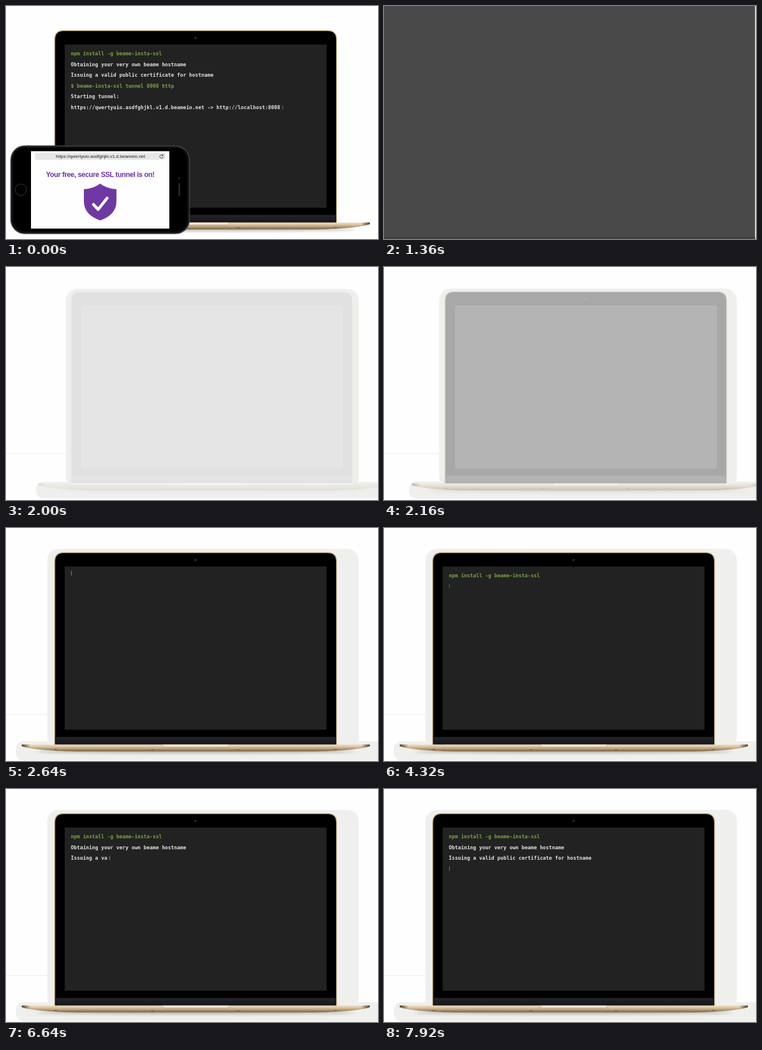
An HTML page that plays this animation: 640x402 px, repeating every 8 s.

```html
<!DOCTYPE html>
<html lang="en">
<head>
<meta charset="utf-8">
<title>Tunnel demo</title>
<style>
  html, body { margin: 0; width: 100%; height: 100%; overflow: hidden; background: #fefefe; }
  svg { display: block; width: 640px; height: 402px; }
  .mono { font: bold 8.68px "DejaVu Sans Mono", monospace; white-space: pre; }
  .sans { font-family: "Liberation Sans", Arial, sans-serif; text-anchor: middle; }
</style>
</head>
<body>
<svg viewBox="0 0 640 402">
  <defs>
    <linearGradient id="gold" x2="0" y2="1">
      <stop offset="0" stop-color="#f0dfc6"/>
      <stop offset=".3" stop-color="#dcc6a4"/>
      <stop offset=".6" stop-color="#b89f78"/>
      <stop offset="1" stop-color="#75603f"/>
    </linearGradient>
    <linearGradient id="ends">
      <stop offset="0" stop-color="#4b3a22"/>
      <stop offset=".025" stop-color="#4b3a22" stop-opacity="0"/>
      <stop offset=".975" stop-color="#4b3a22" stop-opacity="0"/>
      <stop offset="1" stop-color="#4b3a22"/>
    </linearGradient>
    <linearGradient id="hinge" x2="0" y2="1">
      <stop offset="0" stop-color="#24252b"/>
      <stop offset="1" stop-color="#15161a"/>
    </linearGradient>
    <filter id="soft" x="-10%" width="120%" y="-100%" height="300%"><feGaussianBlur stdDeviation="2"/></filter>
  </defs>
  <rect width="640" height="402" fill="#fefefe"/>

  <!-- pale trail left behind by the sliding laptop -->
  <g id="trail" fill="#efefed">
    <rect id="rule" y="321.5" height="1" fill="#ebebeb"/>
    <rect id="lidTrail" y="36" height="345" rx="20"/>
    <rect id="baseTrail" y="368" height="33" rx="13"/>
  </g>

  <g id="slide">
    <path id="blank" d="M84 375V58Q84 42 100 42H553Q569 42 569 58V375Z" fill="#fefefe"/>
    <g id="laptop">
      <ellipse cx="326" cy="386" rx="275" ry="3" fill="#777" opacity=".45" filter="url(#soft)"/>
      <path d="M83.8 375V58Q83.8 42.6 99 42.6H553.500Q568.700 42.600 568.700 58V375Z" fill="#000" stroke="#c6ae87" stroke-width="1.5"/>
      <circle cx="326" cy="55.300" r="1.700" fill="#33363c"/>
      <rect x="101" y="66.500" width="450.500" height="281.500" fill="#222"/>
      <rect x="86" y="360.500" width="481" height="13" fill="url(#hinge)"/>
      <path id="base" d="M27 373.500H626V376.500C609 382 570 385.500 525 385.500H128C83 385.500 44 382 27 376.500Z" fill="url(#gold)"/>
      <path d="M27 373.500H626V376.500C609 382 570 385.500 525 385.500H128C83 385.500 44 382 27 376.500Z" fill="url(#ends)"/>
      <path d="M269 373.500H384Q383.500 377.800 379 377.800H274Q269.500 377.800 269 373.500Z" fill="#f3e7d4" stroke="#a08a66" stroke-width=".6"/>
      <path d="M83 382h5M250 382.500h5M397 382.500h5M564 382h5" stroke="#6b5838"/>
    </g>
  </g>

  <g id="lines" class="mono"></g>
  <rect id="cursor" width="1" height="7.500"/>

  <g id="phone">
    <rect x="8.500" y="241.500" width="307" height="151" rx="24" fill="#050506" stroke="#3c3c42" stroke-width="2"/>
    <rect x="11.500" y="244" width="301" height="146" rx="21.500" fill="#000" stroke="#1c1c20"/>
    <circle cx="25.500" cy="317" r="10" fill="#020202" stroke="#38383c"/>
    <path d="M298 307v20" stroke="#2c2c31" stroke-width="2.500" stroke-linecap="round"/>
    <circle cx="298" cy="297" r="1.800" fill="#202836"/>
    <rect x="43" y="250.500" width="238" height="133.500" fill="#fefefe"/>
    <rect x="50" y="253.500" width="224" height="12" rx="2.500" fill="#e7e7e9"/>
    <text class="sans" x="162.500" y="262.300" font-size="7.920" fill="#222">https://qwertyuio.asdfghjkl.v1.d.beameio.net</text>
    <path d="M269.500 257.500A2.900 2.900 0 1 0 270.400 260" fill="none" stroke="#333"/>
    <path d="M267.500 258.500h3v-3z" fill="#333"/>
    <text class="sans" x="162" y="295" font-size="12" font-weight="bold" letter-spacing="-.33" fill="#6b32a2">Your free, secure SSL tunnel is on!</text>
    <path d="M162 306.500Q174 315.500 190 316V337Q190 360 162 370Q134 360 134 337V316Q150 315.500 162 306.500Z" fill="#7038a3"/>
    <path d="M150.500 342.500L158.500 351L174 331.500" fill="none" stroke="#fff" stroke-width="5" stroke-linecap="round" stroke-linejoin="round"/>
  </g>

  <g id="shade">
    <rect width="638.500" height="402" fill="#1c1c1c"/>
    <rect y="398" width="638.500" height="4" fill="#120f12" opacity=".7"/>
  </g>
</svg>
<script>
const LOOP = 8000, STEP = 80, CHAR_MS = 32, CHAR_W = 5.225, LEFT = 111.5, TOP = 85, PITCH = 18.6;
const GREEN = '#79a443', WHITE = '#e2e2e2';
// text, colour, time its typing starts
const script = [
  ['npm install -g beame-insta-ssl', GREEN, 2992],
  ['Obtaining your very own beame hostname', WHITE, 4496],
  ['Issuing a valid public certificate for hostname', WHITE, 6256],
  ['$ beame-insta-ssl tunnel 8008 http', GREEN, Infinity],
  ['Starting tunnel:', WHITE, Infinity],
  ['https://qwertyuio.asdfghjkl.v1.d.beameio.net -> http://localhost:8008', WHITE, Infinity]
];
const $ = id => document.getElementById(id);
const set = (id, attrs) => { for (const k in attrs) $(id).setAttribute(k, attrs[k]); };
const show = (id, on) => set(id, { visibility: on ? 'visible' : 'hidden' });
const clamp = v => Math.min(1, Math.max(0, v));

const rows = script.map(([, fill], i) => {
  const row = document.createElementNS('http://www.w3.org/2000/svg', 'text');
  row.setAttribute('x', LEFT);
  row.setAttribute('y', TOP + i * PITCH);
  row.setAttribute('fill', fill);
  return $('lines').appendChild(row);
});

function drawTerminal(t, done) {
  let line = 0, typed = 0;
  script.forEach(([text, , start], i) => {
    const n = done ? text.length : Math.max(0, Math.min(text.length, Math.floor((t - start) / CHAR_MS)));
    rows[i].textContent = text.slice(0, n);
    if (n) { line = i; typed = n; }
  });
  if (!done && typed === script[line][0].length) { line++; typed = 0; }
  const blink = .5 + .5 * Math.cos((t - 3200) / 700 * 2 * Math.PI);
  set('cursor', {
    x: LEFT + typed * CHAR_W + (typed ? 3.5 : .5),
    y: TOP + line * PITCH - (line || typed ? 7 : 10.5),
    fill: done ? '#999' : '#86b545',
    opacity: done ? .7 : .45 + .55 * blink
  });
}

function draw(t) {
  const intro = t < 1120;
  const k = intro ? 1 : clamp((t - 1920) / 720);
  const away = 1 - k;
  show('trail', !intro && k > 0);
  show('slide', k > 0);
  show('phone', intro);
  show('cursor', k === 1);
  set('slide', { transform: `translate(${31.5 * away} 0)` });
  set('laptop', { opacity: k });
  const lid = 71 + 36 * away, foot = 17 + 39 * away;
  set('rule', { width: lid });
  set('lidTrail', { x: lid, width: 607 - lid, y: 36 + 2 * away });
  set('baseTrail', { x: foot, width: 660 - foot, y: 368 + 3 * away, height: 33 - 5 * away });
  set('shade', { opacity: intro ? clamp(t / 880) : 1 - clamp((t - 1280) / 400) });
  drawTerminal(t, intro);
}

function tick() {
  const t = performance.now() % LOOP;
  draw(Math.floor(t / STEP) * STEP);
  requestAnimationFrame(tick);
}
tick();
</script>
</body>
</html>
```
